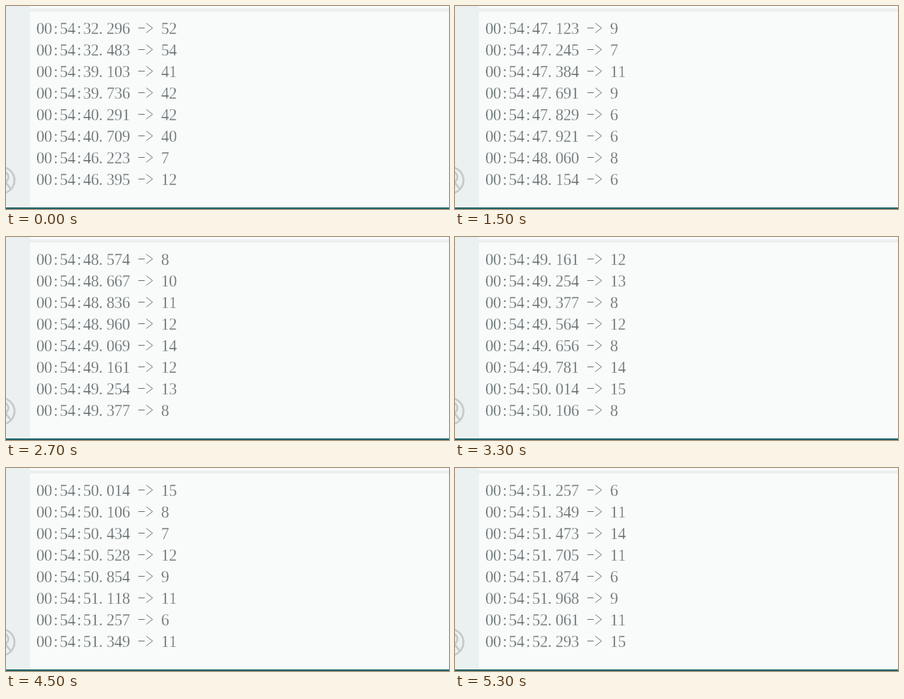
An HTML page that plays this animation: 554 px wide and 254 px high, repeating every 5400 ms.

```html
<!DOCTYPE html>
<html lang="en">
<head>
<meta charset="utf-8">
<title>Serial log</title>
<style>
  html, body { margin: 0; width: 100%; height: 100%; overflow: hidden; background: #f8fbfa; }
  svg { display: block; }
  text {
    font: 20px "Liberation Serif", "Times New Roman", serif;
    fill: #5f6769; stroke: #f8fbfa; stroke-width: 0.3; white-space: pre;
  }
  .icon { fill: none; stroke: #c3cacb; stroke-width: 2.4; }
  .arrow { fill: none; stroke: #778082; }
</style>
</head>
<body>
<svg width="554" height="254" viewBox="0 0 554 254">
  <rect width="554" height="254" fill="#f8fbfa"/>
  <rect width="30" height="254" fill="#ebf0f0"/>
  <rect x="30" y="3" width="524" height="4" fill="#ecf0f0"/>
  <g class="icon">
    <circle cx="-6" cy="218" r="16.6"/>
    <circle cx="-4" cy="214" r="7"/>
    <path d="M-1 220L6 229"/>
  </g>
  <g id="rows"></g>
  <rect y="252" width="554" height="2" fill="#21666a"/>
</svg>
<pre id="log" hidden>
00:54:32.296 -> 52
00:54:32.483 -> 54
00:54:39.103 -> 41
00:54:39.736 -> 42
00:54:40.291 -> 42
00:54:40.709 -> 40
00:54:46.223 -> 7
00:54:46.395 -> 12
00:54:46.535 -> 9
00:54:46.628 -> 4
00:54:46.720 -> 4
00:54:46.808 -> 5
00:54:46.937 -> 9
00:54:47.123 -> 9
00:54:47.245 -> 7
00:54:47.384 -> 11
00:54:47.691 -> 9
00:54:47.829 -> 6
00:54:47.921 -> 6
00:54:48.060 -> 8
00:54:48.154 -> 6
00:54:48.247 -> 6
00:54:48.371 -> 7
00:54:48.449 -> 5
00:54:48.574 -> 8
00:54:48.667 -> 10
00:54:48.836 -> 11
00:54:48.960 -> 12
00:54:49.069 -> 14
00:54:49.161 -> 12
00:54:49.254 -> 13
00:54:49.377 -> 8
00:54:49.564 -> 12
00:54:49.656 -> 8
00:54:49.781 -> 14
00:54:50.014 -> 15
00:54:50.106 -> 8
00:54:50.434 -> 7
00:54:50.528 -> 12
00:54:50.854 -> 9
00:54:51.118 -> 11
00:54:51.257 -> 6
00:54:51.349 -> 11
00:54:51.473 -> 14
00:54:51.705 -> 11
00:54:51.874 -> 6
00:54:51.968 -> 9
00:54:52.061 -> 11
00:54:52.293 -> 15
</pre>
<script>
const LOOP = 5400, TICK = 100;
const CLOCK_START = 46.515, CLOCK_STEP = 0.1094; // log seconds, at first and per tick
const ROWS = 8, LEFT = 38, CELL = 9.75, BASELINE = 35, PITCH = 27;

const log = document.getElementById("log").textContent.trim().split("\n").map(line => {
  const [stamp, value] = line.split(" -> ");
  return { stamp, value, seconds: Number(stamp.split(":")[2]) };
});

function addNode(name, attributes) {
  const node = document.createElementNS("http://www.w3.org/2000/svg", name);
  for (const key in attributes) node.setAttribute(key, attributes[key]);
  return document.getElementById("rows").appendChild(node);
}

// Fixed-width cells; a colon sits in the middle of its cell
function setCells(node, text, firstCell) {
  node.textContent = text;
  node.setAttribute("x", [...text].map((char, i) =>
    LEFT + CELL * (firstCell + i) + (char === ":" ? 2 : -0.1)).join(" "));
}

const rows = Array.from({ length: ROWS }, (_, i) => {
  const y = BASELINE + PITCH * i;
  addNode("path", { class: "arrow", d: `M165.5 ${y - 7.5}h8M175.5 ${y - 13.5}l7.8 6-7.8 6` });
  return { stamp: addNode("text", { y }), value: addNode("text", { y }) };
});

let shown = -1;
function draw(elapsed) {
  const tick = Math.floor(elapsed % LOOP / TICK);
  const clock = CLOCK_START + CLOCK_STEP * tick;
  const arrived = log.filter(line => line.seconds <= clock).length;
  if (arrived === shown) return;
  shown = arrived;
  log.slice(arrived - ROWS, arrived).forEach((line, i) => {
    setCells(rows[i].stamp, line.stamp, 0);
    setCells(rows[i].value, line.value, 16);
  });
}

const start = performance.now();
function animate() {
  draw(performance.now() - start);
  requestAnimationFrame(animate);
}
animate();
</script>
</body>
</html>
```
